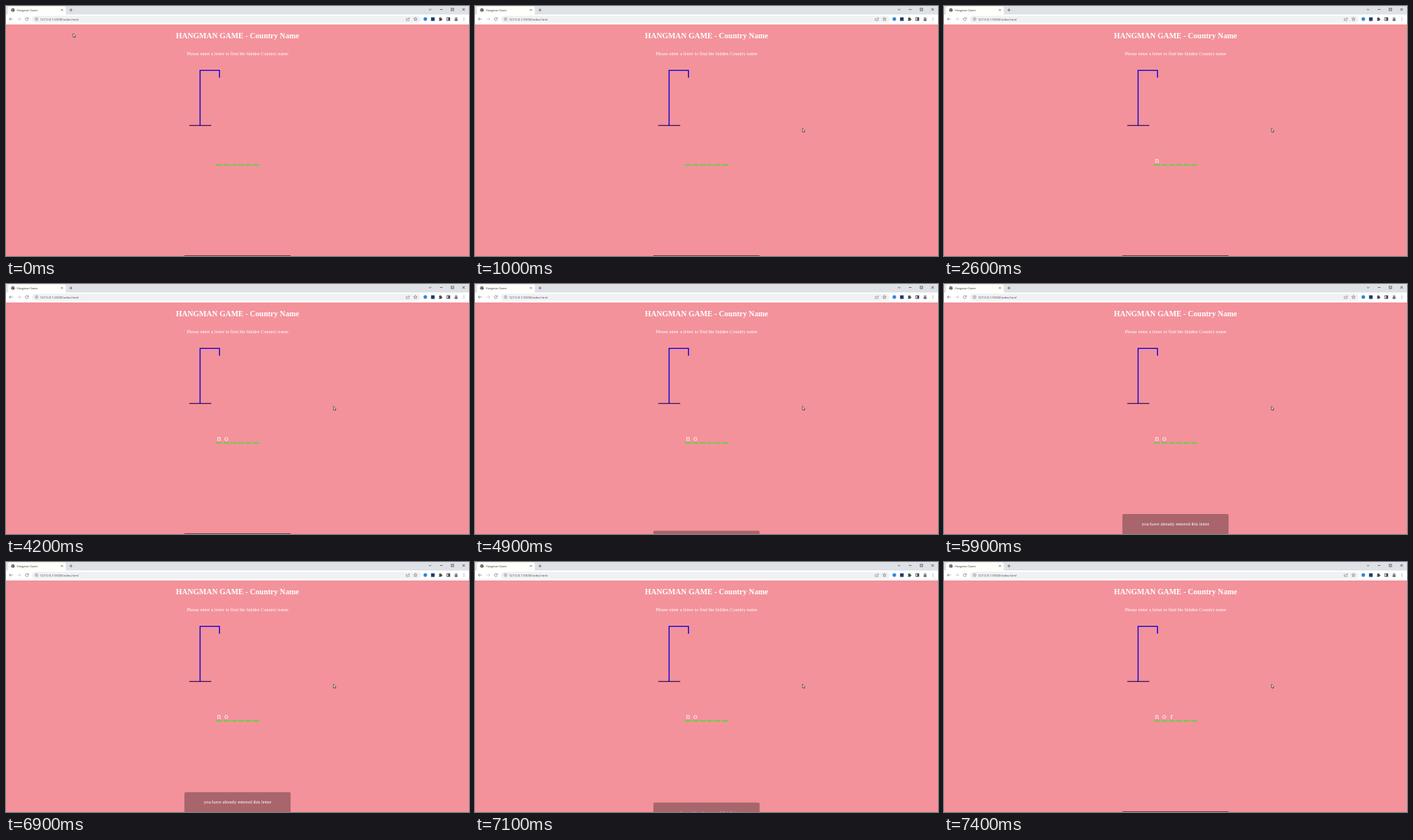
These frames come from a looping animation (600x325 px, 8 s). An HTML page with a canvas:

```html
<!DOCTYPE html>
<html lang="en">
<head>
<meta charset="utf-8">
<title>Hangman Game</title>
<style>
  html, body { margin: 0; width: 100%; height: 100%; overflow: hidden; background: #f3929b; }
  canvas { display: block; width: 600px; height: 325px; }
</style>
</head>
<body>
<canvas id="stage"></canvas>
<script>
const W = 600, H = 325, LOOP = 8000, STEP = 100;
const SERIF = '"Liberation Serif", "Times New Roman", serif';
const UI = '"Open Sans", sans-serif';
const canvas = document.getElementById('stage');
const ctx = canvas.getContext('2d');
const ratio = window.devicePixelRatio || 1;
canvas.width = W * ratio;
canvas.height = H * ratio;

// Pointer position at each step, then at rest
const pointerPath = [
  [87, 35.8], [90, 39], [130, 60], [250, 110], [390, 165], [500, 194],
  [551, 201], [515, 186], [455, 167], [425.2, 158.6], [424.4, 159]
];
const guesses = [['n', 2600], ['o', 4200], ['r', 7300]];
const TOAST = { shown: 299, hidden: 324, enter: 4880, leave: 6870 };

const clamp01 = v => Math.max(0, Math.min(1, v));
const easeOutExpo = p => p >= 1 ? 1 : 1 - 2 ** (-10 * p);
const easeInOut = p => p * p * (3 - 2 * p);

function rect(x, y, w, h, color) {
  ctx.fillStyle = color;
  ctx.fillRect(x, y, w, h);
}

function roundRect(x, y, w, h, r, color) {
  ctx.fillStyle = color;
  ctx.beginPath();
  ctx.roundRect(x, y, w, h, r);
  ctx.fill();
}

function disc(x, y, r, color) {
  ctx.fillStyle = color;
  ctx.beginPath();
  ctx.arc(x, y, r, 0, Math.PI * 2);
  ctx.fill();
}

function ring(x, y, r, color, width, from = 0, to = Math.PI * 2) {
  ctx.strokeStyle = color;
  ctx.lineWidth = width;
  ctx.beginPath();
  ctx.arc(x, y, r, from, to);
  ctx.stroke();
}

function line(points, color, width) {
  ctx.strokeStyle = color;
  ctx.lineWidth = width;
  ctx.beginPath();
  points.forEach(([x, y]) => ctx.lineTo(x, y));
  ctx.stroke();
}

function text(str, x, y, font, color, align = 'center') {
  ctx.font = font;
  ctx.fillStyle = color;
  ctx.textAlign = align;
  ctx.fillText(str, x, y);
}

function cross(x, y, r, color, width) {
  line([[x - r, y - r], [x + r, y + r]], color, width);
  line([[x - r, y + r], [x + r, y - r]], color, width);
}

function arrow(x, dir, color) {
  line([[x - 2.2, 17], [x + 2.2, 17]], color, 0.6);
  line([[x + dir * 0.3, 15.1], [x + dir * 2.2, 17], [x + dir * 0.3, 18.9]], color, 0.6);
}

function star(x, y, r) {
  ctx.strokeStyle = '#555';
  ctx.lineWidth = 0.5;
  ctx.beginPath();
  for (let i = 0; i < 10; i++) {
    const a = i * Math.PI / 5 - Math.PI / 2, d = i % 2 ? r * 0.45 : r;
    ctx.lineTo(x + d * Math.cos(a), y + d * Math.sin(a));
  }
  ctx.closePath();
  ctx.stroke();
}

function drawTabs() {
  rect(0, 0, W, 11, '#dee1e6');
  roundRect(2.5, 0.5, 75, 11, [2.5, 2.5, 0, 0], '#fffffa');
  disc(9, 5.3, 2.3, '#4d5156');
  line([[7.6, 4.6], [9.1, 5.4], [8.4, 6.7]], '#e8e8e8', 0.6);
  line([[9.7, 3.8], [10.4, 5.2]], '#e8e8e8', 0.6);
  text('Hangman Game', 14, 6.6, '3.6px ' + UI, '#3c4043', 'left');
  cross(72.5, 5.2, 1.2, '#444', 0.6);
  line([[82.2, 5.2], [86.2, 5.2]], '#444', 0.6);
  line([[84.2, 3.2], [84.2, 7.2]], '#444', 0.6);

  line([[548, 3.8], [549.6, 5.3], [551.2, 3.8]], '#333', 0.6);
  line([[562.4, 4.5], [565.6, 4.5]], '#222', 0.6);
  ctx.strokeRect(577, 3, 3, 3);
  cross(593, 4.5, 1.6, '#222', 0.6);
}

function drawToolbar() {
  rect(0, 11, W, 13, '#fff');
  arrow(6.5, -1, '#5f6368');
  arrow(17, 1, '#b4b7ba');
  ring(27, 17, 1.9, '#5f6368', 0.6, 0.3, 5.5);
  line([[29.1, 14.7], [29.1, 16.4], [27.4, 16.4]], '#5f6368', 0.6);

  roundRect(33.5, 12.7, 504, 8.8, 4.4, '#eff1f3');
  ring(39.6, 17, 1.8, '#5f6368', 0.5);
  line([[39.6, 16.7], [39.6, 18]], '#5f6368', 0.5);
  rect(39.3, 15.8, 0.6, 0.5, '#5f6368');
  text('127.0.0.1:5500/index.html', 44, 18.5, '4.15px ' + UI, '#45494d', 'left');

  line([[519.7, 16], [518.8, 16], [518.8, 18.9], [522.4, 18.9], [522.4, 17.8]], '#666', 0.5);
  line([[520.2, 17.6], [521, 16.2], [522.9, 16]], '#666', 0.5);
  line([[522, 14.9], [523.1, 16], [522, 17.1]], '#666', 0.5);
  star(530.6, 17.1, 2.4);

  disc(543.4, 17, 2.4, '#2f86d8');
  rect(550.8, 14.7, 4.7, 4.7, '#1d3c66');

  rect(561.1, 15.6, 3.4, 3.6, '#45494d');
  disc(562.8, 15.4, 0.8, '#45494d');
  disc(564.7, 17.4, 0.8, '#45494d');
  disc(561.2, 17.5, 0.6, '#fff');

  ctx.strokeStyle = '#333';
  ctx.lineWidth = 0.7;
  ctx.strokeRect(571.2, 15.1, 3.8, 3.8);
  rect(573.2, 15, 1.9, 4, '#333');

  disc(583.3, 17, 2.9, '#dfe2e3');
  disc(583.3, 16, 1, '#555b60');
  roundRect(581.4, 17.3, 3.8, 2, [1, 1, 0.8, 0.8], '#555b60');
  for (const y of [15.3, 17, 18.7]) disc(593.2, y, 0.45, '#444');
}

function drawPage() {
  rect(0, 24, W, H - 24, '#f3929b');
  text('HANGMAN GAME - Country Name', 300, 42.2, 'bold 10px ' + SERIF, '#fff');
  text('Please enter a letter to find the hidden Country name', 300, 63.6, '6.25px ' + SERIF, '#fff');
  line([[237.5, 155.3], [266, 155.3]], '#2a0a55', 1.1);
  line([[251.5, 155.5], [251.5, 83.6], [276.6, 83.6], [276.6, 93.3]], '#1400d6', 1.3);
}

function drawWord(t) {
  for (let i = 0; i < 6; i++) rect(272 + i * 9.6, 206, 8, 1.3, '#3fe02f');
  guesses.forEach(([letter, time], i) => {
    if (t >= time) text(letter, 276 + i * 9.6, 204, '10px ' + SERIF, '#fff');
  });
}

function drawToast(t) {
  const rise = easeOutExpo(clamp01((t - TOAST.enter) / 1000));
  const fall = easeInOut(clamp01((t - TOAST.leave) / 430));
  const up = rise * (1 - fall);
  const top = TOAST.hidden + (TOAST.shown - TOAST.hidden) * up;
  const alpha = up > 0 ? 0.31 : 0.5;
  roundRect(231.2, top, 137.6, 26, up > 0 ? 1.6 : 0, `rgba(0,0,0,${alpha})`);
  text('you have already entered this letter', 300, top + 15, '6.25px ' + SERIF, '#fff');
}

function drawPointer(t) {
  const [x, y] = pointerPath[Math.min(t / STEP, pointerPath.length - 1)];
  const shape = [[0, 0], [0, 4.8], [1.1, 3.8], [1.9, 5.5], [2.7, 5.1], [1.9, 3.5], [3.4, 3.4]];
  ctx.beginPath();
  shape.forEach(([dx, dy]) => ctx.lineTo(x + dx, y + dy));
  ctx.closePath();
  ctx.fillStyle = '#fff';
  ctx.fill();
  ctx.strokeStyle = '#222';
  ctx.lineWidth = 0.6;
  ctx.stroke();
}

function draw(t) {
  ctx.setTransform(ratio, 0, 0, ratio, 0, 0);
  drawPage();
  drawTabs();
  drawToolbar();
  drawWord(t);
  drawToast(t);
  drawPointer(t);
}

const start = performance.now();
function tick() {
  const t = (performance.now() - start) % LOOP;
  draw(Math.floor(t / STEP) * STEP);
  requestAnimationFrame(tick);
}
tick();
</script>
</body>
</html>
```
